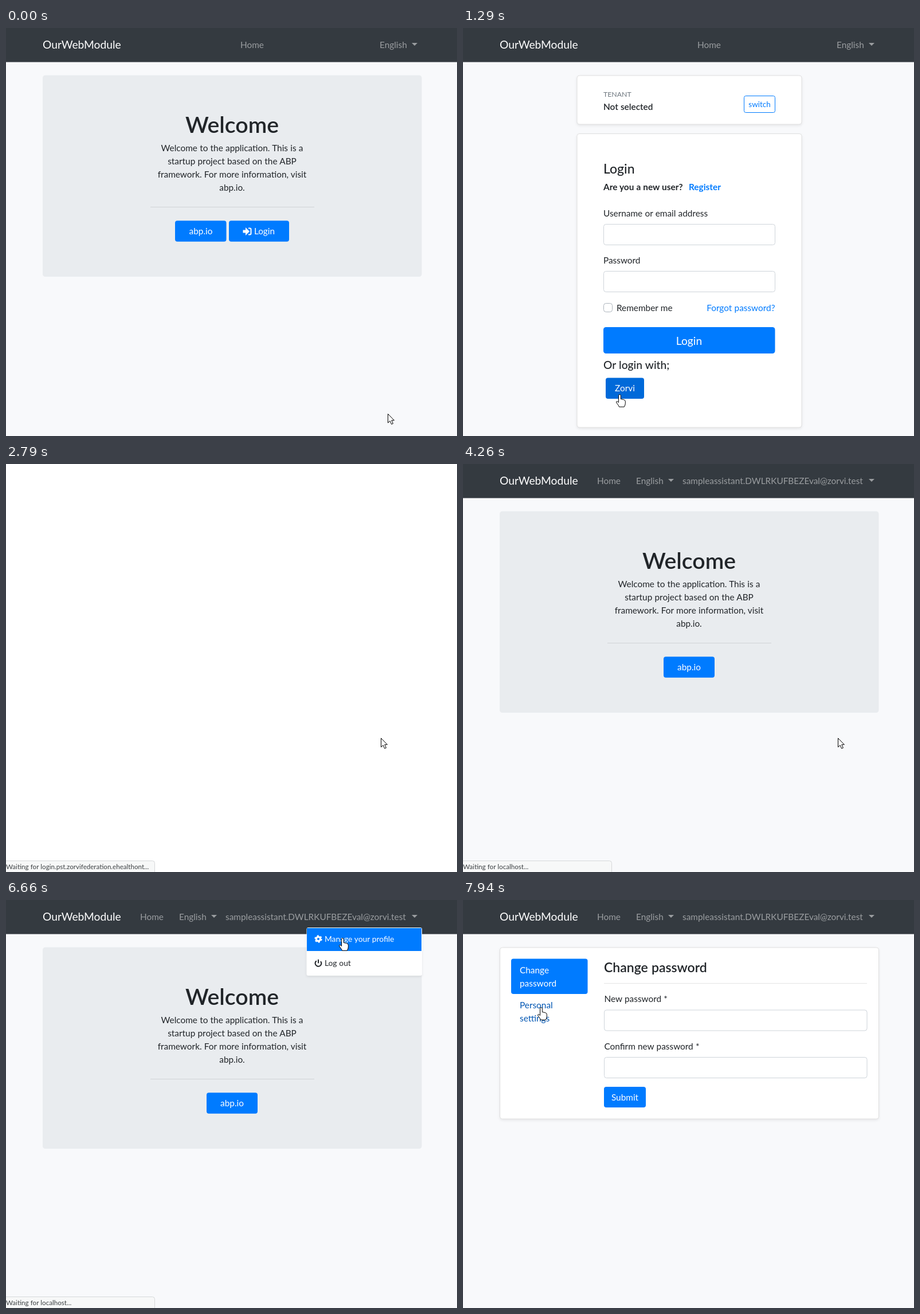
An HTML page that plays this animation: 787 by 712 pixels, repeating every 8000 ms.

```html
<!DOCTYPE html>
<html lang="en">
<head>
<meta charset="utf-8">
<title>Login walkthrough</title>
<style>
  html, body { margin: 0; width: 100%; height: 100%; overflow: hidden; background: #fff; }
  svg { display: block; width: 787px; height: 712px; cursor: none; }
  text { font: 15.36px Lato, "Open Sans", sans-serif; word-spacing: .02em; fill: #212529; white-space: pre; }
  .mid { text-anchor: middle; }
  .end { text-anchor: end; }
  .medium { font-weight: 500; }
  .semi { font-weight: 600; }
  .bold { font-weight: 700; }
  .h1 { font-size: 39.2px; }
  .h4 { font-size: 23px; }
  .h5 { font-size: 19.2px; }
  .small { font-size: 13.44px; }
  .tiny { font-size: 11.6px; }
  .rule { stroke: #000; stroke-opacity: .1; }
  .card { fill: #fff; stroke: #dfdfdf; filter: drop-shadow(0 2px 2px rgba(0, 0, 0, .075)); }
  .field { fill: #fff; stroke: #ced4da; }
  .blue { fill: #007bff; }
  .white, .white text, .btn text { fill: #fff; }
  .btn rect { fill: #007bff; }
  .btn.over rect { fill: #0069d9; }
  .btn text { text-anchor: middle; }
  .link text { fill: #007bff; }
  .link.over text { fill: #0056b3; }
  .nav { opacity: .5; }
  .nav.over, .nav.focus { opacity: .75; }
  .nav text, .nav path { fill: #fff; }
  .nav rect, .link rect, .item rect { fill: transparent; }
  #menu .card { stroke: none; }
  .item { color: #212529; }
  .item text { font-size: 13.8px; }
  .item text, .item path { fill: currentColor; }
  .item.over rect { fill: #f8f9fa; }
  .item.press { color: #fff; }
  .item.press rect { fill: #007bff; }
  #pointer, #status { pointer-events: none; }
  #pointer path { fill: #fff; stroke: #000; stroke-linejoin: round; }
</style>
</head>
<body>
<svg viewBox="0 0 787 712">
  <defs><path id="caret" d="M0 0h10l-5 5z"/></defs>

  <g data-on="guest login member profile">
    <rect width="787" height="712" fill="#f8f9fb"/>
    <rect width="787" height="59.5" fill="#343a40"/>
    <text class="h5 white" x="64" y="36">OurWebModule</text>
  </g>
  <g data-on="guest login">
    <g class="nav hot"><rect x="401" y="10" width="57" height="38"/><text x="409" y="35">Home</text></g>
    <g class="nav hot"><rect x="644" y="10" width="82" height="38"/><text x="652" y="35">English</text>
      <use href="#caret" x="708" y="26" fill="#fff"/></g>
  </g>
  <g data-on="member profile">
    <g class="nav hot"><rect x="226" y="10" width="57" height="38"/><text x="234" y="35">Home</text></g>
    <g class="nav hot"><rect x="295" y="10" width="78" height="38"/><text x="302" y="35">English</text>
      <use href="#caret" x="358" y="26" fill="#fff"/></g>
    <g class="nav hot" id="account"><rect x="376" y="10" width="350" height="38"/>
      <text x="383" y="35">sampleassistant.DWLRKUFBEZEval@zorvi.test</text>
      <use href="#caret" x="708" y="26" fill="#fff"/></g>
  </g>

  <g data-on="guest member">
    <rect x="64" y="82.5" width="661.5" height="351.5" rx="4.5" fill="#e9ecef"/>
    <g class="mid">
      <text class="h1 semi" x="394.5" y="183">Welcome</text>
      <text x="394.5" y="215">Welcome to the application. This is a</text>
      <text x="394.5" y="238">startup project based on the ABP</text>
      <text x="394.5" y="261">framework. For more information, visit</text>
      <text x="394.5" y="284">abp.io.</text>
    </g>
    <path class="rule" d="M252 312.5h286"/>
  </g>
  <g data-on="guest">
    <g class="btn hot"><rect x="295" y="336.2" width="89.5" height="36.5" rx="4"/><text x="340" y="360">abp.io</text></g>
    <g class="btn hot"><rect x="389" y="336.2" width="105" height="36.5" rx="4"/><text x="451" y="360">Login</text>
      <path fill="#fff" d="M413.5 352.5h4.5v-4.5l7 7-7 7v-4.5h-4.5z"/>
      <path fill="none" stroke="#fff" stroke-width="2" d="M423 349.5h2.5a2 2 0 0 1 2 2v7a2 2 0 0 1-2 2h-2.5"/></g>
  </g>
  <g data-on="member">
    <g class="btn hot"><rect x="350" y="336.2" width="89" height="36.5" rx="4"/><text x="394.5" y="360">abp.io</text></g>
  </g>

  <g data-on="login">
    <rect class="card" x="199" y="83" width="392" height="85" rx="4"/>
    <text x="245" y="120" style="font-size:12.3px;fill:#6c757d">TENANT</text>
    <text class="semi" x="245" y="143">Not selected</text>
    <rect x="490.5" y="118.5" width="54" height="29" rx="3" fill="#fff" stroke="#007bff"/>
    <text class="small mid blue" x="517.5" y="138">switch</text>

    <rect class="card" x="199" y="184.5" width="392" height="512.5" rx="4"/>
    <text class="h4 medium" x="245" y="254">Login</text>
    <text class="bold" x="245" y="283">Are you a new user? <tspan class="blue" x="394">Register</tspan></text>
    <text x="245" y="329">Username or email address</text>
    <rect class="field" x="245.5" y="342.5" width="299" height="36" rx="4"/>
    <text x="245" y="411">Password</text>
    <rect class="field" x="245.5" y="424.5" width="299" height="36" rx="4"/>
    <rect x="245.5" y="480.5" width="15" height="15" rx="4" fill="#fff" stroke="#adb5bd"/>
    <text x="268" y="494">Remember me</text>
    <g class="link hot"><text class="end" x="544.5" y="494">Forgot password?</text></g>
    <g class="btn hot"><rect x="245" y="522" width="299.5" height="46" rx="4.5"/><text class="h5" x="394.5" y="553">Login</text></g>
    <text class="h5 medium" x="245" y="595">Or login with;</text>
    <g class="btn hot"><rect x="249" y="610.5" width="67" height="36.5" rx="4"/><text x="282.5" y="634">Zorvi</text></g>
  </g>

  <g data-on="profile">
    <rect class="card" x="64.5" y="83" width="661" height="299" rx="4"/>
    <rect class="blue" x="84" y="102.5" width="133.5" height="61.5" rx="4"/>
    <g class="white"><text x="99" y="128">Change</text><text x="99" y="151">password</text></g>
    <g class="link hot"><rect x="84" y="166" width="133" height="60"/>
      <text x="99" y="189">Personal</text><text x="99" y="212">settings</text></g>
    <text class="h4 semi" x="246" y="125.5">Change password</text>
    <path class="rule" d="M246 145.5h459"/>
    <text x="246.5" y="178">New password *</text>
    <rect class="field" x="246.5" y="192" width="458.5" height="36" rx="4"/>
    <text x="246.5" y="261">Confirm new password *</text>
    <rect class="field" x="246.5" y="274.5" width="458.5" height="36" rx="4"/>
    <g class="btn hot"><rect x="246" y="326" width="73" height="36" rx="4"/><text x="282.5" y="350">Submit</text></g>
  </g>

  <g id="menu">
    <rect class="card" x="524.5" y="48" width="201.5" height="84" rx="3"/>
    <g class="item hot" id="manage"><rect x="525" y="49" width="200" height="40"/>
      <circle cx="545" cy="68" r="3.6" fill="none" stroke="currentColor" stroke-width="3.2"/>
      <circle cx="545" cy="68" r="5.7" fill="none" stroke="currentColor" stroke-width="2" stroke-dasharray="3 2.97"/>
      <text x="556" y="73">Manage your profile</text></g>
    <g class="item hot"><rect x="525" y="91" width="200" height="40"/>
      <g fill="none" stroke="currentColor" stroke-width="2" stroke-linecap="round">
        <circle cx="545" cy="110.5" r="5.3" stroke-dasharray="23 11" transform="rotate(-32 545 110.5)"/>
        <line x1="545" y1="104.5" x2="545" y2="109.5"/></g>
      <text x="556" y="115">Log out</text></g>
  </g>

  <g id="status">
    <rect x="-5.5" y="692.5" width="265" height="30" rx="4" fill="#f7f8f8" stroke="#d6d8da"/>
    <text class="tiny" x="0" y="707" style="fill:#3c4043"></text>
  </g>
  <g id="pointer">
    <path id="arrow" d="M0 0v15.5l3.6-3.3 2.6 5.8 2.7-1.2-2.6-5.6h4.6z"/>
    <path id="hand" d="M-2 13V2a1.9 1.9 0 0 1 3.8 0v6l5 1q3 .7 3 3.4v3q0 3-2 6.3H-1q-1-3-3.8-6-2-2.6-.6-3.5 1.4-.8 3.4 1.8z"/>
  </g>
</svg>
<script>
const LOOP = 8000;
const $ = id => document.getElementById(id);

const local = "Waiting for localhost...";
const pages = [[0, "guest"], [700, "login"], [1860, "blank"], [4180, "member"], [6980, "profile"]];
const statuses = [
  [0, ""], [380, "https://localhost/Account/Login"], [540, local], [850, ""],
  [1780, local], [2560, "Establishing secure connection..."],
  [2790, "Waiting for login.pst.zorvifederation.ehealthont..."], [3710, local], [4960, ""],
  [6050, "https://localhost/Account/Manage"], [6590, local], [7540, ""]
];
// Pointer moves: first step, last step, number of steps, x, y
const moves = [
  [70, 380, 5, 436, 352], [930, 1290, 6, 273, 639], [2330, 2560, 4, 654, 478],
  [4490, 4730, 4, 424, 403], [4880, 5270, 6, 453, 26], [5740, 6050, 5, 587, 66],
  [6980, 7070, 2, 613, 222], [7140, 7290, 3, 678, 320], [7460, 7940, 7, 136, 187]
];

const current = (list, t) => list.findLast(([start]) => t >= start)[1];
const between = (t, a, b) => t >= a && t < b;
const show = (el, on) => { el.style.display = on ? "" : "none"; };

function pointerAt(t) {
  let x = 666, y = 673;
  for (const [start, end, steps, toX, toY] of moves) {
    if (t < start) break;
    const done = Math.floor((t - start) / (end - start) * (steps - 1) + 1e-6) + 1;
    const p = Math.min(1, done / steps);
    x += (toX - x) * p;
    y += (toY - y) * p;
  }
  return [x, y];
}

function draw(t) {
  const page = current(pages, t);
  for (const el of document.querySelectorAll("[data-on]")) show(el, el.dataset.on.split(" ").includes(page));
  show($("menu"), between(t, 5350, 6980));
  $("account").classList.toggle("focus", between(t, 5350, 6510));
  $("manage").classList.toggle("press", between(t, 6510, 6670));

  const message = current(statuses, t);
  show($("status"), message);
  $("status").lastElementChild.textContent = message;

  const [x, y] = pointerAt(t);
  const target = document.elementFromPoint(x, y)?.closest(".hot");
  for (const el of document.querySelectorAll(".hot")) el.classList.toggle("over", el === target);
  show($("hand"), target);
  show($("arrow"), !target);
  $("pointer").setAttribute("transform", `translate(${Math.round(x) + .5} ${Math.round(y) + .5})`);
}

const begin = performance.now();
function tick() {
  draw((performance.now() - begin) % LOOP);
  requestAnimationFrame(tick);
}
tick();
</script>
</body>
</html>
```
